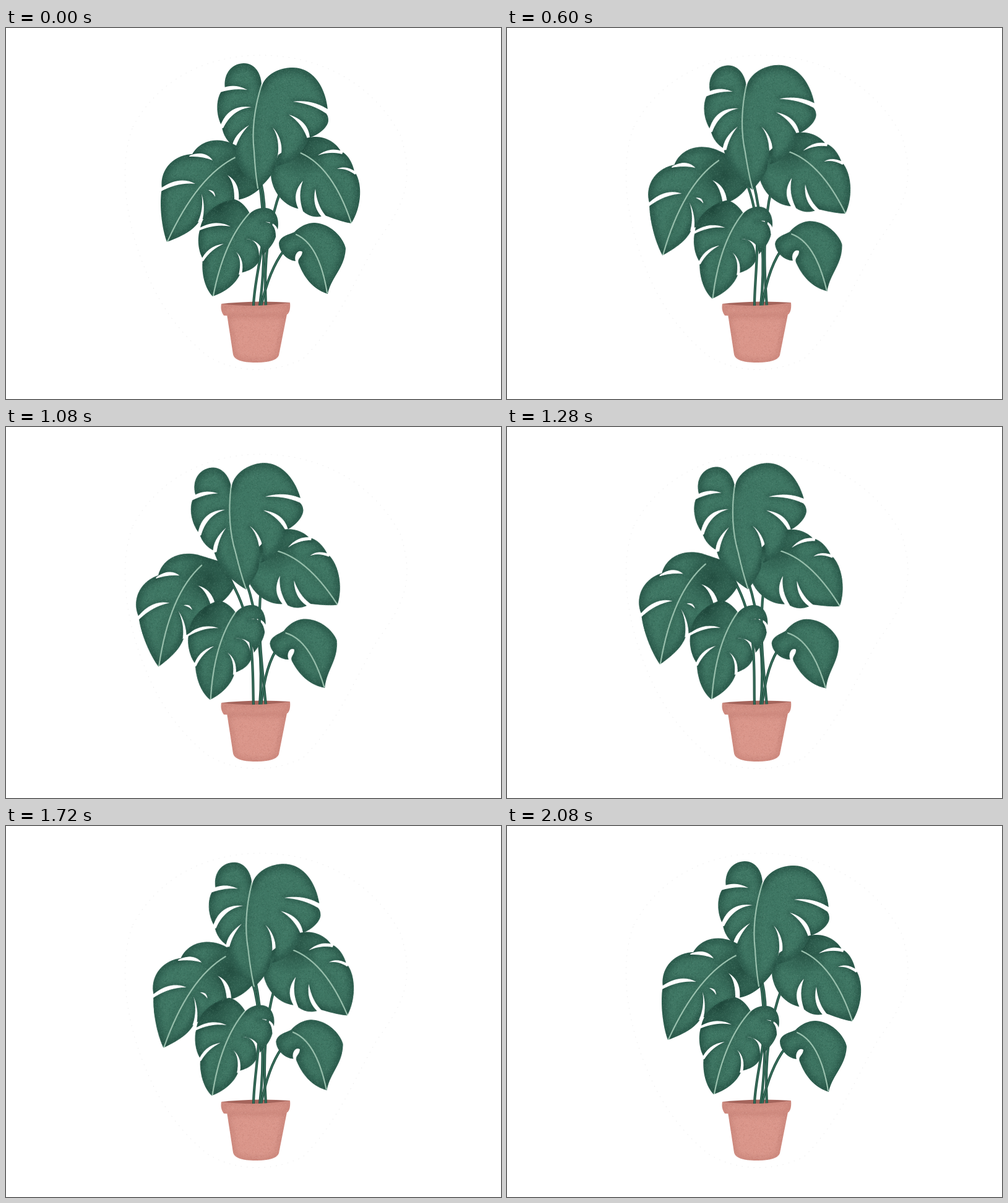
Write an HTML page with a canvas that moves like this. It is 800 px wide and 600 px high and loops after 2120 ms.

```html
<!DOCTYPE html>
<html lang="en">
<head>
<meta charset="utf-8">
<title>Swaying plant</title>
<style>
html, body { margin: 0; width: 100%; height: 100%; overflow: hidden; background: #fff; }
canvas { display: block; }
</style>
</head>
<body>
<canvas id="stage" width="800" height="600"></canvas>
<script>
const W = 800, H = 600, RES = 2, LOOP = 2120, STEP = 40;
const stage = document.getElementById('stage').getContext('2d');
stage.imageSmoothingQuality = 'high';

const GREEN = { base: '#3f7764', edge: '#173f34', dark: '#1c463a', light: '#6b9f8a' };
const PINK = { base: '#db978b', edge: '#b56f65', dark: '#b9766c', light: '#ecb9ae' };

let seed = 7;
const rand = () => (seed = (seed * 16807) % 2147483647) / 2147483647;

// pivot and angle: how far each leaf leans at the end of the sway
const leaves = {
  left: {
    pivot: [399, 414], angle: 16.3,
    outline: 'M372 190C345 175 315 180 301 204C270 205 248 230 252 259C247 285 252 325 260 346C290 335 305 325 314 310C330 308 338 300 341 295C360 292 370 282 373 278C390 276 405 266 415 255L410 215Z',
    cuts: [
      'M297 206Q322 197 334 214Q316 207 296 208Z',
      'M249 260Q280 238 306 252Q278 249 249 265Z',
      'M316 268Q320 292 310 314L317 312Q323 290 316 268Z',
      'M358 238Q370 250 369 282L376 280Q379 250 358 238Z',
      'M327 262Q338 262 338 273Q334 266 327 262Z'
    ],
    vein: 'M373 208Q310 238 261 345',
    shade: [378, 232, 52]
  },
  right: {
    pivot: [436, 390], angle: 14.5,
    outline: 'M480 180C505 170 530 180 541 199C552 204 560 217 563 232C577 250 575 290 558 316C540 313 524 306 515 303C500 309 485 303 477 293C450 290 430 265 428 238L440 205Z',
    cuts: [
      'M545 200Q525 191 504 206Q524 199 543 204Z',
      'M567 234Q550 221 535 228Q549 226 564 237Z',
      'M500 260Q493 290 514 309L519 306Q503 290 500 260Z',
      'M480 247Q459 270 475 297L480 296Q471 270 480 247Z'
    ],
    vein: 'M476 202Q528 225 558 315',
    shade: [476, 195, 50]
  },
  top: {
    pivot: [407, 368], angle: 10.25,
    outline: 'M413 96C414 74 402 57 385 57C364 57 351 75 354 97C341 104 336 135 349 159C350 172 358 184 367 190C368 215 385 243 407 261C420 250 431 237 437 223C457 221 481 206 488 178C502 175 520 162 521 150C521 143 519 139 515 136L520 133C517 98 498 64 463 64C436 64 416 80 413 96Z',
    cuts: [
      'M350 97Q370 89 390 100Q368 97 346 104Z',
      'M345 162Q358 122 397 128Q366 131 351 162Z',
      'M365 193Q368 172 393 157Q378 172 371 193Z',
      'M431 161Q441 175 440 200Q438 215 433 230L438 223Q447 208 445 190Q442 172 431 161Z',
      'M457 140Q489 150 491 178L488 182Q480 155 457 140Z',
      'M464 119Q497 115 524 134L517 138Q495 123 464 119Z'
    ],
    vein: 'M413 92Q395 150 401 200Q403 235 407 259'
  },
  low: {
    pivot: [385, 468], angle: 7.7,
    outline: 'M394 300C388 288 378 279 369 277C345 280 318 298 314 324C308 340 311 362 318 373C315 398 322 422 334 434C352 428 372 415 379 396C395 393 408 385 411 371C425 358 435 347 437 333C443 318 441 293 420 291C410 290 400 294 394 300Z',
    cuts: [
      'M310 325Q338 308 363 321Q337 316 309 329Z',
      'M314 378Q325 352 352 349Q331 358 319 377Z',
      'M372 362Q382 375 376 399L381 398Q386 375 372 362Z',
      'M388 341Q411 342 409 376L414 371Q417 345 388 341Z',
      'M412 314Q436 311 436 337L440 332Q439 311 412 314Z'
    ],
    vein: 'M393 300Q352 345 335 433',
    shade: [345, 292, 45]
  },
  small: {
    pivot: [455, 462], angle: 7.4,
    outline: 'M441 348C443 336 458 334 466 330C478 318 490 315 499 315C528 317 546 342 549 356C548 388 526 402 520 430C500 424 483 408 473 381C470 372 478 372 479 362C472 357 465 368 468 377C455 376 441 363 441 348Z',
    cuts: [],
    vein: 'M469 334Q506 350 519 428'
  }
};

// base end, two controls, top end; the last two follow the leaf
const stems = [
  { leaf: 'left', pts: [400, 450, 401, 395, 430, 325, 412, 250] },
  { leaf: 'top', pts: [410, 450, 419, 385, 419, 310, 409, 245] },
  { leaf: 'right', pts: [420, 450, 416, 380, 424, 315, 445, 260] },
  { leaf: 'small', pts: [412, 450, 419, 420, 430, 385, 449, 360] }
];

const pot = {
  body: 'M357 463L367 528Q370 541 403 541Q437 541 441 529L454 463Z',
  rim: 'M348 446Q403 453 459 444C460 454 458 460 455 463Q403 469 352 465Q346 457 348 446Z'
};

function layer() {
  const c = document.createElement('canvas');
  c.width = W * RES;
  c.height = H * RES;
  const g = c.getContext('2d');
  g.scale(RES, RES);
  return g;
}

function bounds(d) {
  const n = d.match(/\d+/g).map(Number);
  const xs = n.filter((v, i) => i % 2 === 0), ys = n.filter((v, i) => i % 2);
  const x = Math.min(...xs), y = Math.min(...ys);
  return [x, y, Math.max(...xs) - x, Math.max(...ys) - y];
}

function softStroke(g, path, color, width, blur, alpha) {
  g.filter = `blur(${blur * RES}px)`;
  g.globalAlpha = alpha;
  g.strokeStyle = color;
  g.lineWidth = width;
  g.stroke(path);
  g.filter = 'none';
  g.globalAlpha = 1;
}

function grain(g, box, tone, density) {
  const [x, y, w, h] = box;
  for (let i = w * h * density; i > 0; i--) {
    const dark = rand() < 0.6, s = 0.5 + rand() * 0.6;
    g.globalAlpha = dark ? 0.3 : 0.25;
    g.fillStyle = dark ? tone.dark : tone.light;
    g.fillRect(x + rand() * w, y + rand() * h, s, s);
  }
  g.globalAlpha = 1;
}

function paintLeaf(leaf) {
  const g = layer(), shape = new Path2D(leaf.outline), vein = new Path2D(leaf.vein);
  const cuts = leaf.cuts.map(d => new Path2D(d));
  g.lineCap = g.lineJoin = 'round';
  g.fillStyle = GREEN.base;
  g.fill(shape);
  g.globalCompositeOperation = 'destination-out';
  cuts.forEach(c => g.fill(c));
  g.globalCompositeOperation = 'source-atop';
  softStroke(g, shape, GREEN.edge, 11, 6, 0.75);
  cuts.forEach(c => softStroke(g, c, GREEN.edge, 6, 4, 0.5));
  softStroke(g, vein, GREEN.edge, 8, 6, 0.3);
  if (leaf.shade) {
    const [x, y, r] = leaf.shade, f = g.createRadialGradient(x, y, 0, x, y, r);
    f.addColorStop(0, 'rgba(20,56,46,.65)');
    f.addColorStop(1, 'rgba(20,56,46,0)');
    g.fillStyle = f;
    g.fillRect(x - r, y - r, 2 * r, 2 * r);
  }
  grain(g, bounds(leaf.outline), GREEN, 0.5);
  g.strokeStyle = '#9cc3b0';
  g.lineWidth = 2.1;
  g.stroke(vein);
  return g.canvas;
}

function paintPart(d) {
  const g = layer(), shape = new Path2D(d);
  g.fillStyle = PINK.base;
  g.fill(shape);
  g.globalCompositeOperation = 'source-atop';
  softStroke(g, shape, PINK.edge, 7, 5, 0.6);
  grain(g, bounds(d), PINK, 0.45);
  return g.canvas;
}

// faint dotted blob around the plant
function paintHalo() {
  const g = layer();
  g.strokeStyle = '#ececec';
  g.lineWidth = 1;
  g.setLineDash([1.5, 8]);
  g.stroke(new Path2D('M205 160C245 85 320 45 410 44C520 44 600 100 638 175C660 245 645 285 600 345C560 415 535 480 480 535C430 560 370 558 325 530C270 485 240 430 225 390C195 320 180 225 205 160Z'));
  return g.canvas;
}

for (const leaf of Object.values(leaves)) leaf.art = paintLeaf(leaf);
const halo = paintHalo(), body = paintPart(pot.body), rim = paintPart(pot.rim);
const put = art => stage.drawImage(art, 0, 0, W, H);
const lean = (leaf, p) => -leaf.angle * p * Math.PI / 180;

function turn(leaf, p, x, y) {
  const a = lean(leaf, p), [px, py] = leaf.pivot;
  const c = Math.cos(a), s = Math.sin(a);
  return [px + (x - px) * c - (y - py) * s, py + (x - px) * s + (y - py) * c];
}

function drawStem({ leaf, pts }, p) {
  const [x, y, ax, ay, bx, by, tx, ty] = pts, l = leaves[leaf];
  stage.beginPath();
  stage.moveTo(x, y);
  stage.bezierCurveTo(ax - 3 * p, ay, ...turn(l, p, bx, by), ...turn(l, p, tx, ty));
  stage.strokeStyle = '#245143';
  stage.lineWidth = 4.2;
  stage.stroke();
  stage.strokeStyle = '#3b7561';
  stage.lineWidth = 1.5;
  stage.stroke();
}

function drawLeaf(leaf, p) {
  const [x, y] = leaf.pivot;
  stage.save();
  stage.translate(x, y);
  stage.rotate(lean(leaf, p));
  stage.translate(-x, -y);
  put(leaf.art);
  stage.restore();
}

// the first pose is held for three steps
function sway(t) {
  const k = Math.max(0, Math.floor(t / STEP) - 2);
  return (1 - Math.cos(2 * Math.PI * (k + 0.3) / 51)) / 2;
}

function draw(t) {
  const p = sway(t);
  stage.fillStyle = '#fff';
  stage.fillRect(0, 0, W, H);
  put(halo);
  put(body);
  stage.fillStyle = '#a4645b';
  stage.fill(new Path2D('M348 446Q403 440 459 444L456 451Q403 457 352 452Z'));
  stems.forEach(s => drawStem(s, p));
  put(rim);
  for (const leaf of Object.values(leaves)) drawLeaf(leaf, p);
}

const start = performance.now();
function tick() {
  draw((performance.now() - start) % LOOP);
  requestAnimationFrame(tick);
}
tick();
</script>
</body>
</html>
```
